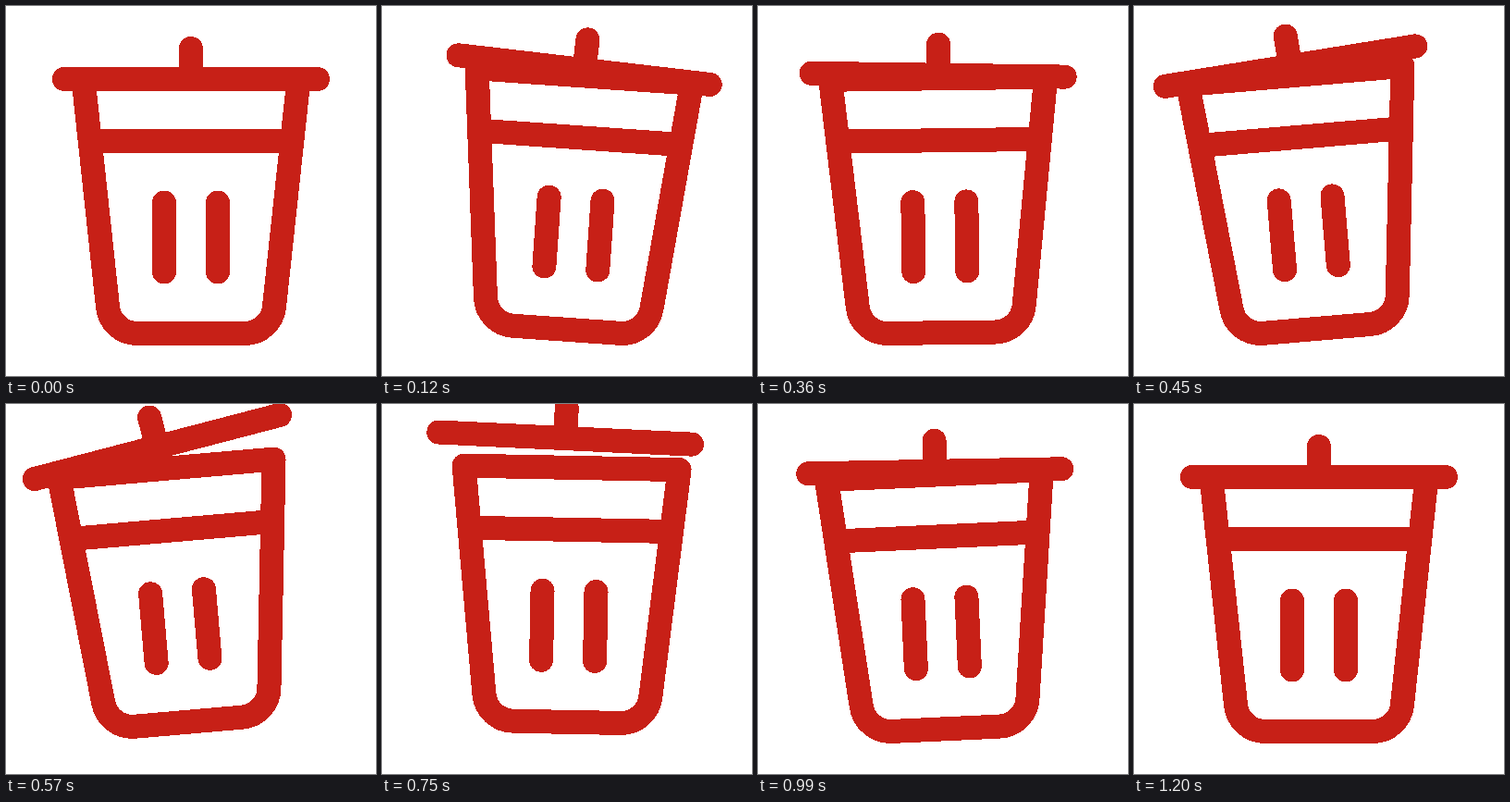
Animation of 400 by 400 pixels, one loop 3230 ms. Source, as an HTML page:

```html
<!DOCTYPE html>
<html lang="en">
<head>
<meta charset="utf-8">
<title>Rattling bin</title>
<style>
html, body { margin: 0; width: 100%; height: 100%; overflow: hidden; background: #fff; }
svg { display: block; width: 100%; height: 100%; }
</style>
</head>
<body>
<svg viewBox="0 0 400 400" fill="none" stroke="#c72017" stroke-width="26"
     stroke-linecap="round" stroke-linejoin="round" shape-rendering="crispEdges">
  <g id="bin">
    <path d="M83.5 79L110 325A32 32 0 0 0 142 354H258A32 32 0 0 0 290 325L316.5 79Z"/>
    <path d="M91 146H309M171 212.5V287.5M229 212.5V287.5"/>
    <path id="lid" d="M63 79H337M200 79V46"/>
  </g>
</svg>
<script>
const LOOP = 3230, STEP = 30, END = 1200;
const FOOT = 60, LID = 137; // half widths that the bin and the lid pivot on

const bin = document.getElementById('bin'), lid = document.getElementById('lid');

// Swings from 0 through [time, value] turning points and back to 0 at END.
function swing(t, ...turns) {
  let [t0, a] = [0, 0];
  for (const [t1, b] of [...turns, [END, 0]]) {
    if (t < t1) return a + (b - a) * (1 - Math.cos(Math.PI * (t - t0) / (t1 - t0))) / 2;
    [t0, a] = [t1, b];
  }
  return 0;
}

// One jump between two times
function jump(t, from, to, height) {
  return t > from && t < to ? height * Math.sin(Math.PI * (t - from) / (to - from)) : 0;
}

// Tilting over either end lifts the middle.
function place(el, x, lift, deg, half, py) {
  const y = -lift - half * Math.sin(Math.abs(deg) * Math.PI / 180);
  el.setAttribute('transform', `translate(${x} ${y}) rotate(${deg} 200 ${py})`);
}

function draw(now) {
  const t = Math.floor(now % LOOP / STEP) * STEP;

  place(bin,
    swing(t, [570, -2.7], [960, 3]),
    jump(t, 480, 960, 9.2),
    swing(t, [190, 5.7], [505, -5.7], [845, 2.6], [1010, -2.8]),
    FOOT, 354);

  place(lid,
    swing(t, [240, -1.5], [360, 0], [530, -8], [750, -7.5], [990, 1]),
    jump(t, 565, 970, 28) + jump(t, 990, END, 4),
    swing(t, [240, 5.3], [600, -9.9], [790, 3]),
    LID, 79);

  requestAnimationFrame(draw);
}
draw(0);
</script>
</body>
</html>
```
